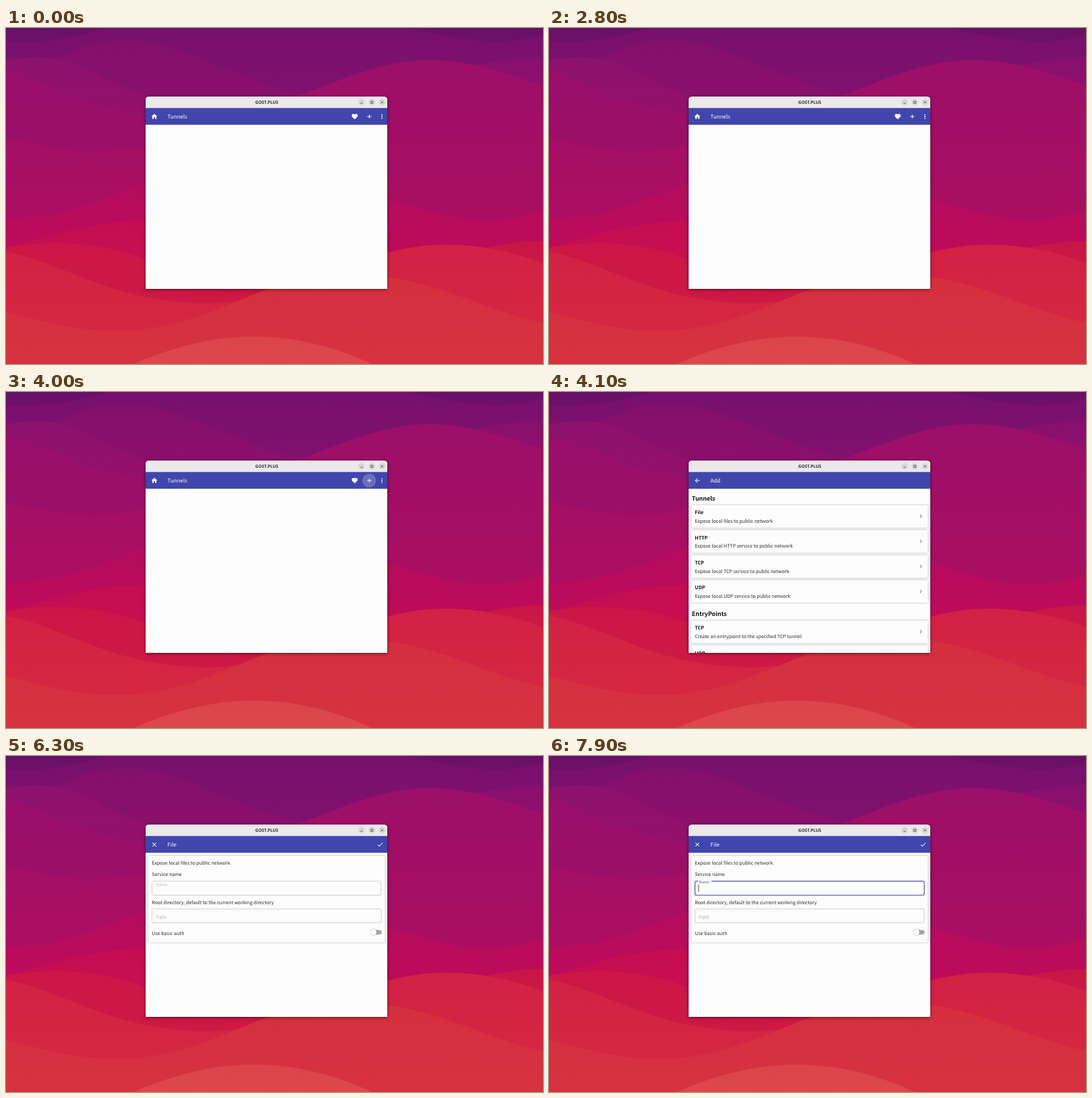
These frames come from a looping animation (800 px wide and 501 px high, 8 s). An HTML page:

```html
<!DOCTYPE html>
<html lang="en">
<head>
<meta charset="utf-8">
<title>Tunnels</title>
<style>
  html, body { margin: 0; width: 100%; height: 100%; overflow: hidden; background: #7b116e; }
  svg { display: block; width: 800px; height: 501px; }
  text { font: 7.14px "Noto Sans CJK SC", "Noto Sans CJK JP", "Noto Sans CJK", "Noto Sans", sans-serif; fill: #2c2c2c; text-rendering: geometricPrecision; }
  .bold { font-weight: 700; fill: #111; }
  .head { font-size: 8.93px; }
  .title { font-size: 8.03px; fill: #fff; }
  .caption { font: 700 6.4px "Noto Sans", sans-serif; fill: #2e2e2e; text-anchor: middle; }
  .window { filter: drop-shadow(0 1px 2.5px rgba(0, 0, 0, .55)); }
  .card { fill: #fefdfd; filter: drop-shadow(0 .6px .8px rgba(0, 0, 0, .38)); }
  .icon { fill: #fff; }
  .chevron { fill: #777; }
  .field { fill: none; stroke: #c9c9c9; stroke-width: .9; }
  .hint { fill: #b5b5b5; }

  .home, .add, .form, .ripple, .name-box, .gap, .caret, .label { animation: 8s step-end infinite; }
  .home { animation-name: home; }
  .add { animation-name: add; }
  .form { animation-name: form; }
  .ripple { animation-name: ripple; transform-origin: 541px 132px; }
  .name-box { animation-name: name-box; }
  .gap { animation-name: gap; }
  .caret { animation-name: gap; }
  .label { animation-name: label; }

  @keyframes home { 0% { visibility: visible } 51.25%, 100% { visibility: hidden } }
  @keyframes add { 0% { visibility: hidden } 51.25% { visibility: visible } 78.75%, 100% { visibility: hidden } }
  @keyframes form { 0% { visibility: hidden } 78.75%, 100% { visibility: visible } }
  @keyframes ripple {
    0% { opacity: 0; transform: scale(.4) }
    47.5% { opacity: .14; transform: scale(.5) }
    48.75% { opacity: .2; transform: scale(.85) }
    50% { opacity: .22; transform: scale(1) }
    51.25%, 100% { opacity: 0; transform: scale(1) }
  }
  @keyframes name-box {
    0% { stroke: #c9c9c9; stroke-width: .9 }
    88.75% { stroke: #8d8d8d; stroke-width: .9 }
    97.5%, 100% { stroke: #4552b4; stroke-width: 1.2 }
  }
  @keyframes gap { 0% { opacity: 0 } 95%, 100% { opacity: 1 } }
  @keyframes label {
    0% { transform: translate(223.5px, 194.3px) scale(.87); fill: #bcbcbc }
    80% { transform: translate(223.5px, 201.2px); fill: #b5b5b5 }
    88.75% { transform: translate(223.5px, 201.2px); fill: #828282 }
    97.5% { transform: translate(223.5px, 195.4px) scale(.9); fill: #6d72ac }
    98.75%, 100% { transform: translate(223.5px, 190.1px) scale(.8); fill: #5a62a8 }
  }
</style>
</head>
<body>
<svg viewBox="0 0 800 501">
  <defs>
    <clipPath id="frame"><path d="M208 389V107.500Q208 102.500 213 102.500H563Q568 102.500 568 107.500V389Z"/></clipPath>
    <path id="i-home" d="M10 20v-6h4v6h5v-8h3L12 3 2 12h3v8z"/>
    <path id="i-heart" d="M12 21.350l-1.450-1.320C5.400 15.360 2 12.280 2 8.500 2 5.420 4.420 3 7.500 3c1.740 0 3.410.81 4.500 2.090C13.090 3.810 14.760 3 16.500 3 19.580 3 22 5.420 22 8.500c0 3.780-3.400 6.860-8.550 11.540z"/>
    <path id="i-plus" d="M19 13h-6v6h-2v-6H5v-2h6V5h2v6h6z"/>
    <path id="i-dots" d="M10 6a2 2 0 1 1 4 0a2 2 0 1 1-4 0M10 12a2 2 0 1 1 4 0a2 2 0 1 1-4 0M10 18a2 2 0 1 1 4 0a2 2 0 1 1-4 0"/>
    <path id="i-back" d="M20 11H7.830l5.590-5.590L12 4l-8 8 8 8 1.410-1.410L7.830 13H20z"/>
    <path id="i-close" d="M19 6.410L17.590 5 12 10.590 6.410 5 5 6.410 10.590 12 5 17.590 6.410 19 12 13.410 17.590 19 19 17.590 13.410 12z"/>
    <path id="i-check" d="M9 16.170L4.830 12l-1.420 1.410L9 19 21 7l-1.410-1.410z"/>
    <path id="i-chevron" d="M10 6L8.590 7.410 13.170 12l-4.580 4.590L10 18l6-6z"/>
  </defs>

  <g id="waves"></g>

  <path class="window" fill="#fefdfd" d="M208 389V107.500Q208 102.500 213 102.500H563Q568 102.500 568 107.500V389Z"/>
  <g clip-path="url(#frame)">
    <rect x="208" y="102" width="360" height="17.500" fill="#ebe9e9"/>
    <rect x="208" y="119.300" width="360" height="25" fill="#4046ab"/>
    <text class="caption" x="388.500" y="113.300">GOST.PLUS</text>
    <g fill="#d8d6d6">
      <circle cx="529.700" cy="110.800" r="4.700"/>
      <circle cx="545" cy="110.800" r="4.700"/>
      <circle cx="560.200" cy="110.800" r="4.700"/>
    </g>
    <path fill="none" stroke="#444" stroke-width=".8" d="M528 112.200h3.500M543.400 109.200h3.200v3.200h-3.200zM558.700 109.300l3 3m0-3l-3 3"/>

    <g class="home">
      <circle class="ripple" cx="541" cy="132" r="10.300" fill="#fff"/>
      <g class="icon" data-icons="home 221 132, heart 519.5 132, plus 541.3 132, dots 560 132"></g>
      <text class="title" x="240.500" y="135">Tunnels</text>
    </g>

    <g class="add">
      <g class="icon" data-icons="back 221 132"></g>
      <text class="title" x="240.500" y="135">Add</text>
      <text class="bold head" x="212.800" y="161.800">Tunnels</text>
      <text class="bold head" x="212.800" y="333.500">EntryPoints</text>
      <g id="cards"></g>
    </g>

    <g class="form">
      <g class="icon" data-icons="close 221 132, check 557.5 132"></g>
      <text class="title" x="240.500" y="135">File</text>
      <rect class="card" x="212" y="148.500" width="352.500" height="129.500" rx="2"/>
      <text x="217.300" y="161.700">Expose local files to public network.</text>
      <text x="217.300" y="179.200">Service name</text>
      <rect class="field name-box" x="217.500" y="186.700" width="341.500" height="20.800" rx="2"/>
      <rect class="gap" x="222" y="185.600" width="19.800" height="2.300" fill="#fefdfd"/>
      <text class="label">Name</text>
      <rect class="caret" x="222.500" y="191.800" width=".9" height="10.600" fill="#333"/>
      <text x="217.300" y="220.700">Root directory, default to the current working directory</text>
      <rect class="field" x="217.500" y="228" width="341.500" height="20.600" rx="2"/>
      <text class="hint" x="223.500" y="242.700">Path</text>
      <text x="217.300" y="266.700">Use basic auth</text>
      <rect x="544" y="259.600" width="15.500" height="6.600" rx="3.300" fill="#a5a5a5"/>
      <circle class="card" cx="547.600" cy="262.900" r="4.300"/>
    </g>
  </g>
</svg>
<script>
  const byId = id => document.getElementById(id);
  const icon = (name, x, y) =>
    `<use href="#i-${name}" transform="translate(${x} ${y}) scale(.446) translate(-12 -12)"/>`;

  // Each layer: outline, colour at its top, colour at its foot, and the two heights.
  const layers = [
    ['M0 0H800V501H0Z', '#77106d', '#81116e', 0, 100],
    ['M0 0H152C105 14 65 22 0 21Z', '#681067', '#701069', 0, 22],
    ['M598 0H800V9C770 20 735 23 695 18C655 13 625 6 598 0Z', '#681067', '#701069', 0, 22],
    ['M70 49C110 25 145 18 182 18C265 20 320 72 450 102V501H70Z', '#84106c', '#8a106b', 18, 110],
    ['M640 75C700 51 750 44 800 43V501H640Z', '#86106e', '#90106c', 43, 90],
    ['M0 48C40 42 75 42 103 53C155 75 190 106 300 125V501H0Z', '#8d126e', '#94106a', 44, 130],
    ['M0 66C62 78 112 126 230 131V501H0Z', '#980f6a', '#9d0f67', 66, 190],
    ['M0 163C60 182 150 196 230 168V501H0Z', '#a40f65', '#ac0e62', 165, 285],
    ['M400 113C480 88 550 48 630 48C700 48 750 70 800 86V501H400Z', '#9c0f69', '#aa0e61', 48, 285],
    ['M0 285C90 284 150 250 230 223L500 235C600 263 660 287 710 287C750 287 780 278 800 273V501H0Z', '#b40c5f', '#be0b59', 230, 335],
    ['M0 332C60 307 150 284 230 288C300 294 350 320 420 360V501H0Z', '#c50d53', '#c80f4e', 288, 370],
    ['M0 327C60 316 140 318 208 345C280 378 330 386 420 390V501H0Z', '#cc1646', '#ce1944', 318, 410],
    ['M690 335C730 322 770 318 800 318V501H690Z', '#c91547', '#cd1845', 318, 350],
    ['M0 333C65 346 130 386 208 401C290 417 345 412 400 394C480 363 570 323 655 323C710 323 760 335 800 351V501H0Z', '#d12146', '#d52741', 323, 450],
    ['M0 423C60 439 110 452 165 452C260 452 330 410 400 386C470 365 540 364 600 377C670 393 735 426 800 440V501H0Z', '#d52f3f', '#d63240', 370, 501],
    ['M190 501C250 475 310 460 368 460C430 460 490 475 545 501Z', '#d94548', '#dc484b', 460, 501],
  ];
  byId('waves').innerHTML = layers.map(([d, top, foot, y1, y2], i) => `
    <linearGradient id="w${i}" gradientUnits="userSpaceOnUse" x1="0" x2="0" y1="${y1}" y2="${y2}">
      <stop stop-color="${top}"/><stop offset="1" stop-color="${foot}"/>
    </linearGradient>
    <path d="${d}" fill="url(#w${i})"/>`).join('');

  const card = (y, name, note) => `
    <rect class="card" x="212" y="${y}" width="352.500" height="34" rx="2"/>
    <text class="bold" x="217.300" y="${y + 13.8}">${name}</text>
    <text x="217.300" y="${y + 26.5}">${note}</text>
    <g class="chevron">${icon('chevron', 554, y + 16.8)}</g>`;
  const step = 37.35;
  const expose = what => `Expose local ${what} to public network`;
  const entry = what => `Create an entrypoint to the specified ${what} tunnel`;
  byId('cards').innerHTML =
    ['File', 'HTTP', 'TCP', 'UDP'].map((name, i) =>
      card(168.5 + i * step, name, expose(i ? name + ' service' : 'files'))).join('') +
    ['TCP', 'UDP'].map((name, i) => card(340.4 + i * step, name, entry(name))).join('');

  for (const g of document.querySelectorAll('[data-icons]'))
    g.innerHTML = g.dataset.icons.split(', ').map(s => icon(...s.split(' '))).join('');
</script>
</body>
</html>
```
